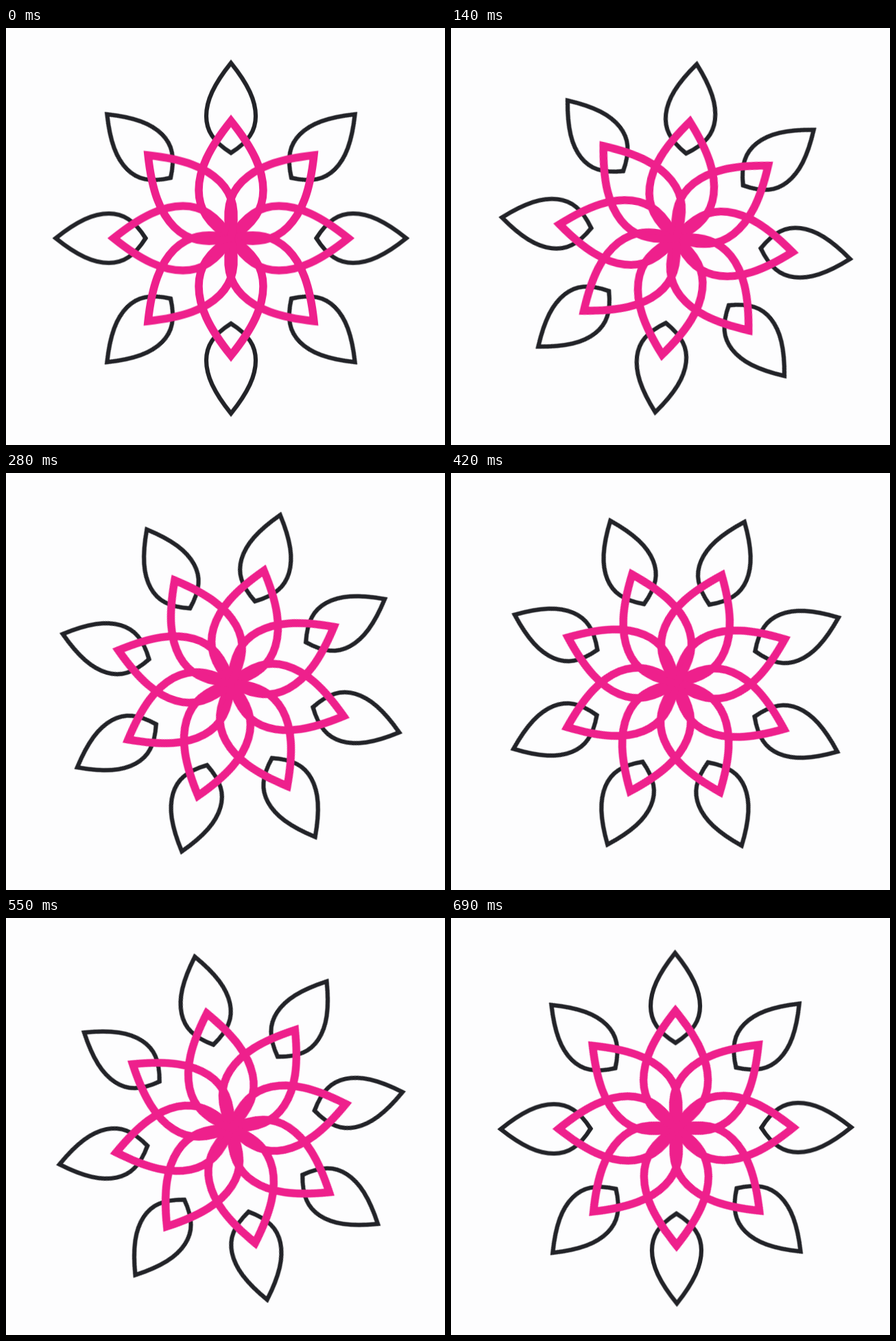
These frames come from a looping animation (640 px wide and 608 px high, 0.83 s). An HTML page:

```html
<!DOCTYPE html>
<html lang="en">
<head>
<meta charset="utf-8">
<title>Turning flower</title>
<style>
  html, body { margin: 0; width: 100%; height: 100%; overflow: hidden; background: #fdfdfe; }
  svg { display: block; width: 100vw; height: 100vh; }
  path { fill: none; stroke-linejoin: miter; }
  .leaf { stroke: #222328; stroke-width: 6.2; }
  .petal { stroke: #ee208c; stroke-width: 11.5; }
</style>
</head>
<body>
<svg viewBox="0 0 640 608">
  <g transform="translate(328 306.5)"><g id="flower"></g></g>
</svg>
<script>
  const flower = document.getElementById('flower');

  // A pointed petal, base at (0, -base), growing upwards.
  function petalPath(base, scale) {
    const at = (x, y) => `${x * scale} ${-base - y * scale}`;
    return `M${at(0, 171)}` +
      `C${at(33, 130)} ${at(47, 99)} ${at(47, 70)}` +
      `C${at(47, 43)} ${at(34, 21)} ${at(0, 0)}` +
      `C${at(-34, 21)} ${at(-47, 43)} ${at(-47, 70)}` +
      `C${at(-47, 99)} ${at(-33, 130)} ${at(0, 171)}Z`;
  }

  function addRing(className, d, count = 8) {
    for (let i = 0; i < count; i++) {
      const path = document.createElementNS('http://www.w3.org/2000/svg', 'path');
      path.setAttribute('class', className);
      path.setAttribute('d', d);
      path.setAttribute('transform', `rotate(${i * 360 / count})`);
      flower.append(path);
    }
  }

  addRing('leaf', petalPath(124.5, 0.766));
  addRing('petal', petalPath(0, 1));

  // [start in ms, angle in degrees]; each pose is held until the next.
  const LOOP = 830;
  const poses = [[0, 0], [140, 6.8], [280, 16.3], [420, 23], [550, 33.1], [690, 44.7], [LOOP, 45]];
  const turn = flower.animate(
    poses.map(([ms, angle]) => ({
      offset: ms / LOOP,
      transform: `rotate(${angle}deg)`,
      easing: 'steps(1, end)'
    })),
    { duration: LOOP, iterations: Infinity }
  );
  turn.startTime = 0;
</script>
</body>
</html>
```
